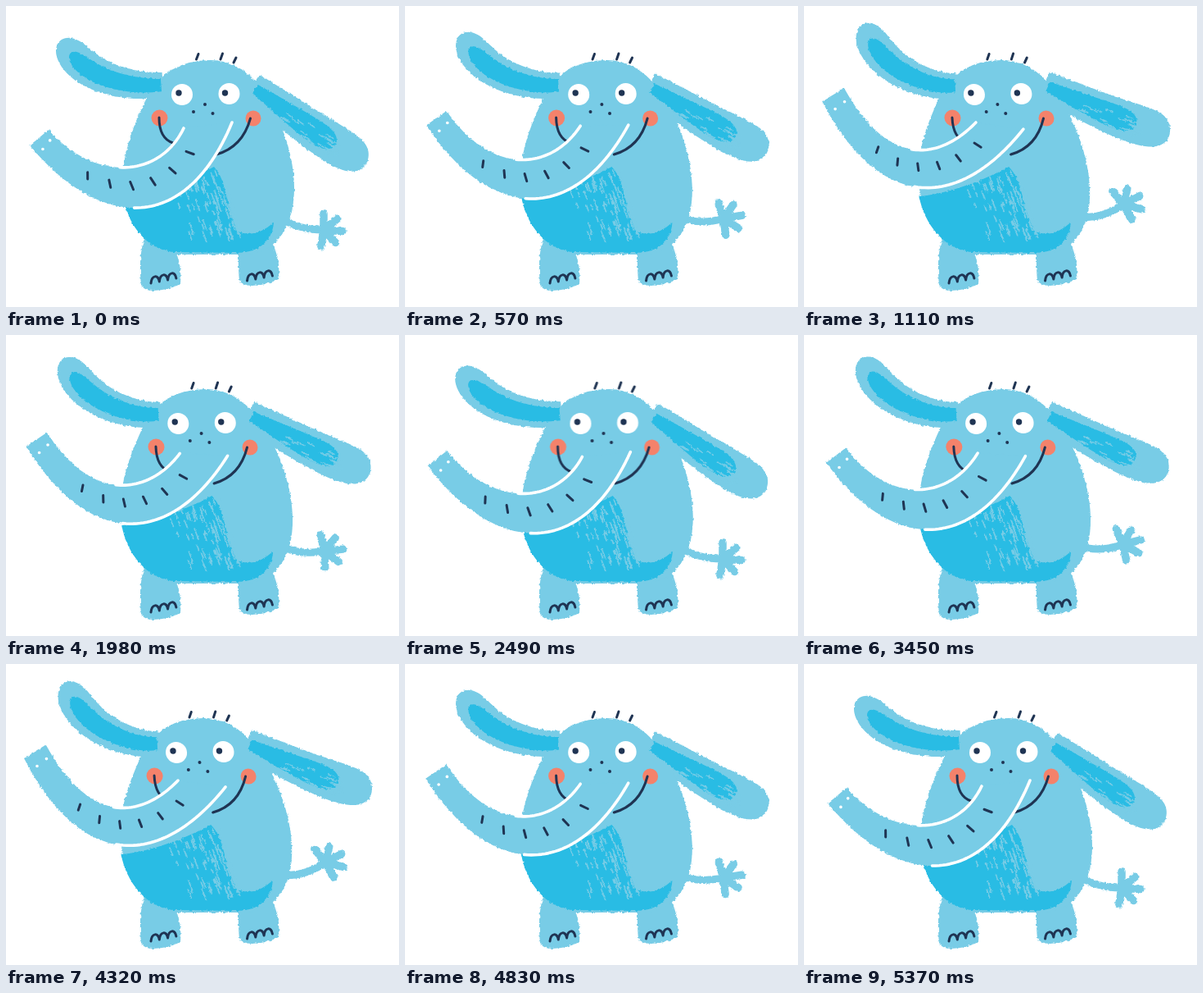
Recreate the animation shown at these times as an HTML page. Size 480 by 367 pixels, loop 5.4 s.

```html
<!DOCTYPE html>
<html lang="en">
<head>
<meta charset="utf-8">
<title>Waving elephant</title>
<style>
  html, body { margin: 0; width: 100%; height: 100%; overflow: hidden; background: #fff; }
  svg { display: block; width: 100%; height: 100%; }
  .light { fill: #78cce6; }
  .dark { fill: #29bce4; }
  .ink { fill: none; stroke: #1f3453; stroke-width: 3; stroke-linecap: round; stroke-linejoin: round; }
  .chalk { fill: none; stroke: #fff; stroke-width: 3.6; stroke-linecap: round; stroke-linejoin: round; }
  .brush { fill: none; stroke: #78cce6; stroke-linecap: round; }
  .dot { fill: #1f3453; }
  .white { fill: #fff; }
  .cheek { fill: #f4826b; }
</style>
</head>
<body>
<svg viewBox="0 0 480 367">
  <defs>
    <filter id="rough" filterUnits="userSpaceOnUse" x="0" y="0" width="480" height="367" color-interpolation-filters="sRGB">
      <feTurbulence type="fractalNoise" baseFrequency="0.3" numOctaves="2" seed="4"/>
      <feDisplacementMap in="SourceGraphic" scale="3.5" xChannelSelector="R" yChannelSelector="G"/>
    </filter>
    <path id="foot" d="M170 280C163 300 163 320 165 340Q168 347 180 347Q200 346 213 339C214 322 213 312 204 291Z"/>
    <path id="toes" d="M177 338c1 -10 9 -11 10.300 -2c1 -10 9 -11 10.300 -2c1 -10 9 -11 10.300 -2"/>
  </defs>
  <g filter="url(#rough)">
    <path id="tail" class="brush" stroke-width="9"/>
    <path id="tuft" class="brush" stroke-width="9.500"/>
    <use href="#foot" class="light"/>
    <use href="#foot" class="light" x="120" y="-6"/>
    <path id="earL" class="light"/>
    <path id="earR" class="light"/>
    <g class="lean">
      <path class="light" d="M250 66Q285 66 312 100C335 135 352 180 352 222C352 275 325 303 290 303H205C170 300 143 255 143 208C143 175 158 140 172 112Q195 66 250 66Z"/>
      <path class="dark" d="M143 232C175 230 225 212 254 196C272 215 268 250 284 275Q304 284 327 264C325 290 305 301 280 301L204 300C172 297 148 266 143 232Z"/>
      <path id="scratches" class="brush" stroke-width="1.700"/>
    </g>
    <path id="innerL" class="dark"/>
    <path id="innerR" class="dark"/>
    <path id="earScratches" class="brush" stroke-width="1.500"/>
  </g>
  <use href="#toes" class="ink"/>
  <use href="#toes" class="ink" x="117.500" y="-3"/>
  <g class="lean">
    <circle class="cheek" cx="187.500" cy="136.500" r="10"/>
    <circle class="cheek" cx="302" cy="137" r="9.500"/>
    <circle class="white" cx="215" cy="108" r="13"/>
    <circle class="white" cx="272.500" cy="107" r="13"/>
    <circle class="dot" cx="211" cy="106" r="3.700"/>
    <circle class="dot" cx="267.500" cy="106" r="3.700"/>
    <circle class="dot" cx="243" cy="120" r="2"/>
    <circle class="dot" cx="229" cy="129" r="2"/>
    <circle class="dot" cx="252.500" cy="131" r="2"/>
    <path class="ink" d="M235 58.500L232.500 65M264.500 58L262 65M281 63L278 69"/>
    <path class="ink" d="M187 136C187 152 192 163 204 167M298.500 137C293 157 282 174 257 181"/>
  </g>
  <path id="trunk" class="light" filter="url(#rough)"/>
  <path id="ridges" class="chalk"/>
  <path id="wrinkles" class="ink"/>
  <path id="nostrils" class="chalk"/>
</svg>
<script>
const LOOP = 5400;
const $ = id => document.getElementById(id);
const draw = (id, d) => $(id).setAttribute('d', d);
const mix = (a, b, k) => a + (b - a) * k;
const mixPoint = (p, q, k) => [mix(p[0], q[0], k), mix(p[1], q[1], k)];
const range = n => Array.from({ length: n }, (_, i) => i);
const line = points => 'M' + points.join('L');

// A spine is a cubic Bezier with a resting and a raised pose.
const poses = (...texts) => texts.map(s => s.split(' ').map(p => p.split(',').map(Number)));
const earL = poses('192,96 150,100 89,88 70,40', '187,97 148,101 84,73 76,21');
const earR = poses('300,98 335,122 397,171 441,190', '293,96 333,114 401,149 447,154');
const trunkTop = poses('52,151 105,212 186,213 217,149', '49,99 105,201 168,185 210,142');
const trunkLow = poses('29,170 112,270 218,282 276,142', '22,115 90,248 186,252 268,150');

// Cosine easing between [time, value] keys.
const headKeys = [[0, 0], [1410, 1], [2705, 0], [4000, 1], [LOOP, 0]];
const trunkKeys = [[0, 0], [1230, 1], [3000, 0], [4330, 1], [LOOP, 0]];
const tailKeys = [[0, 0], [1260, 1], [2400, 0], [2600, 0], [4200, 1], [5300, 0], [LOOP, 0]];

function track(keys, t) {
  const i = keys.findIndex(k => k[0] > t);
  const [t0, v0] = keys[i - 1], [t1, v1] = keys[i];
  return mix(v0, v1, (1 - Math.cos(Math.PI * (t - t0) / (t1 - t0))) / 2);
}

function random(seed) {
  return () => (seed = seed * 16807 % 2147483647) / 2147483647;
}

// weight(s) gives the share of the raised pose from the first to the last control point.
const blend = ([low, high], weight) => low.map((p, i) => mixPoint(p, high[i], weight(i / 3)));

// Point on a Bezier, moved sideways by offset.
function along([a, b, c, d], s, offset = 0) {
  const ab = mixPoint(a, b, s), bc = mixPoint(b, c, s), cd = mixPoint(c, d, s);
  const p = mixPoint(ab, bc, s), q = mixPoint(bc, cd, s);
  const dx = q[0] - p[0], dy = q[1] - p[1], k = offset / Math.hypot(dx, dy);
  const [x, y] = mixPoint(p, q, s);
  return [x - dy * k, y + dx * k];
}

const sample = (spine, from = 0, to = 1) => range(33).map(i => along(spine, mix(from, to, i / 32)));

// Leaf around a spine: half-width grows from root to end, then rounds off.
function leaf(spine, from, to, rootWidth, endWidth) {
  const side = sign => range(33).map(i => {
    const s = Math.sin(i / 32 * Math.PI / 2);
    return along(spine, mix(from, to, s), sign * mix(rootWidth, endWidth, s) * Math.sqrt(1 - s ** 8));
  });
  return line([...side(1), ...side(-1).reverse()]) + 'Z';
}

function drawBellyScratches() {
  const rand = random(11);
  draw('scratches', range(95).map(() => {
    const y = 200 + rand() * 76, length = 3 + rand() * 10;
    const x = 286 - rand() ** 1.7 * 70 - (276 - y) * 0.28;
    return `M${x},${y}l${length * 0.35},${length}`;
  }).join(''));
}

function drawEars(lift) {
  const left = blend(earL, () => lift), right = blend(earR, () => lift);
  draw('earL', leaf(left, 0, 1, 15, 24));
  draw('innerL', leaf(left, 0.02, 0.87, 8, 13));
  draw('earR', leaf(right, 0, 1, 17, 28));
  draw('innerR', leaf(right, 0.04, 0.73, 6, 18));
  const rand = random(5);
  draw('earScratches', range(26).map(() => {
    const s = 0.74 - rand() ** 1.5 * 0.45, offset = mix(-6, 18, rand());
    return line([along(right, s, offset), along(right, s + 0.05, offset)]);
  }).join(''));
}

function drawTrunk(swing, lift) {
  // The root follows the head, the tip follows the swing.
  const weight = s => mix(swing, lift, s * s);
  const top = blend(trunkTop, weight), low = blend(trunkLow, weight);
  const across = (s, k) => mixPoint(along(top, s), along(low, s), k);
  draw('trunk', line([...sample(top), ...sample(low).reverse()]) + 'Z');
  draw('ridges', line(sample(top, 0.48)) + line(sample(low, 0.48)));
  draw('wrinkles', range(6).map(i => 0.27 + 0.12 * i)
    .map(s => line([across(s, 0.36), across(s, 0.55)])).join(''));
  draw('nostrils', [0.25, 0.7].map(k => `M${across(0.04, k)}h.1`).join(''));
}

function drawTail(wag) {
  const end = mixPoint([388, 273], [390, 241], wag);
  draw('tail', `M335,257Q${mixPoint([355, 273], [364, 260], wag)} ${end}`);
  draw('tuft', range(5).map(i => {
    const angle = (-90 + 47 * i - 36 * wag) * Math.PI / 180;
    return line([end, [end[0] + 23 * Math.cos(angle), end[1] + 20 * Math.sin(angle)]]);
  }).join(''));
}

function render(t) {
  const lift = track(headKeys, t) * 1.13;
  const shear = 0.0365 * lift;
  document.querySelectorAll('.lean').forEach(g =>
    g.setAttribute('transform', `matrix(1 0 ${shear} 1 ${-300 * shear} 0)`));
  drawEars(lift);
  drawTrunk(track(trunkKeys, t), lift);
  drawTail(track(tailKeys, t));
}

drawBellyScratches();
function tick() {
  render(performance.now() % LOOP);
  requestAnimationFrame(tick);
}
tick();
</script>
</body>
</html>
```
